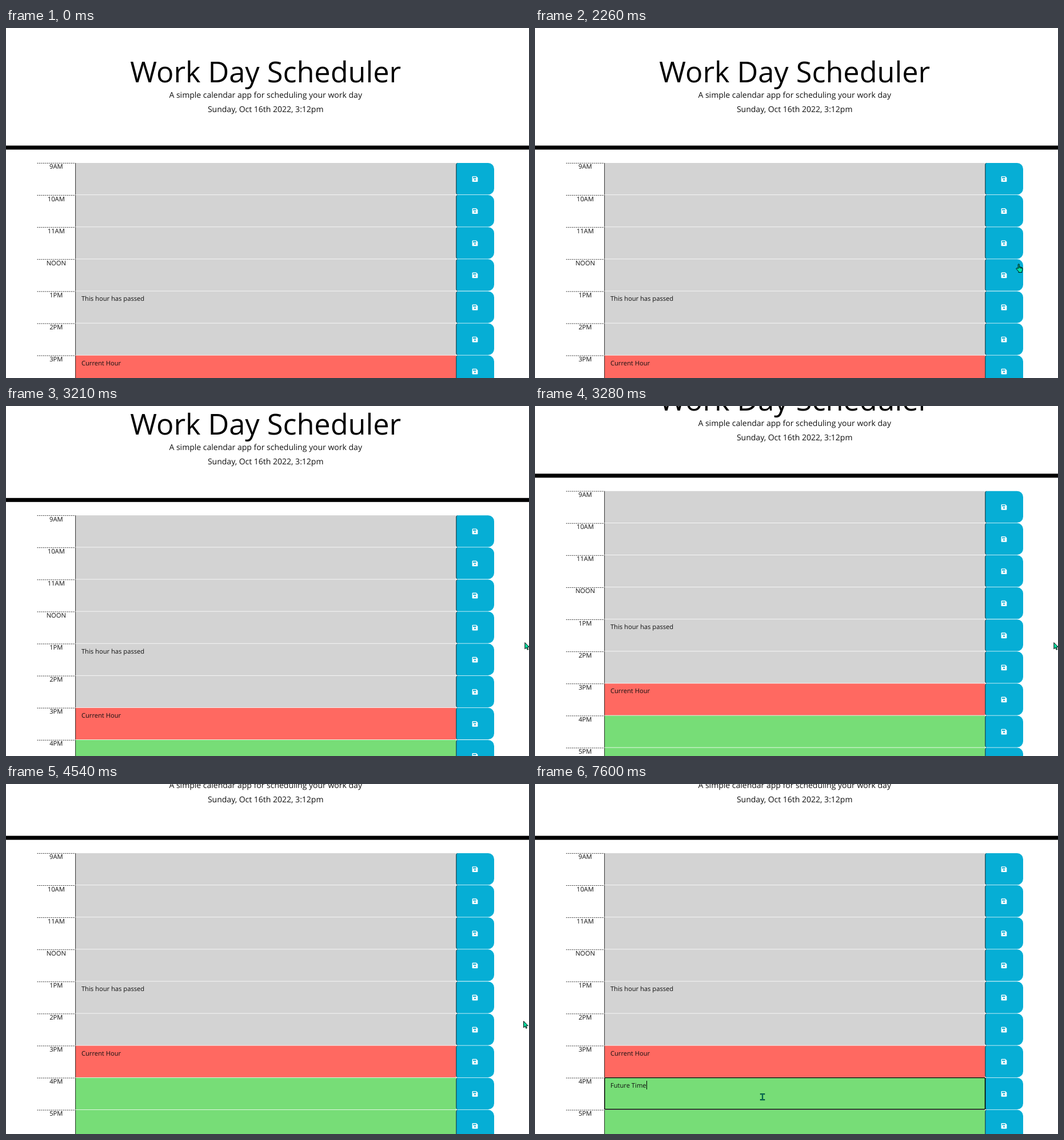
An HTML page that plays this animation: 915 by 612 pixels, repeating every 8 s.

```html
<!DOCTYPE html>
<html lang="en">
<head>
<meta charset="utf-8">
<title>Work Day Scheduler</title>
<style>
  html, body { margin: 0; width: 100%; height: 100%; overflow: hidden; background: #fff; }
  svg { display: block; width: 915px; height: 612px; }
  text { font: 11.2px "Open Sans", sans-serif; fill: #111; white-space: pre; text-rendering: geometricPrecision; }
  .mid { text-anchor: middle; }
  .title { font-size: 50.4px; fill: #000; }
  .lead { font-size: 14px; }
  .dash { stroke: #000; stroke-width: .8; stroke-dasharray: 2.1 1.4; }
  .edge { stroke: #000; stroke-width: .8; fill: none; }
  .skin { fill: #00e3a5; stroke: #000; stroke-width: 1.4; stroke-linejoin: round; }
</style>
</head>
<body>
<svg viewBox="0 0 915 612">
  <defs>
    <path id="save" fill="#fff" fill-rule="evenodd" d="M1 0H7.2L9.8 2.6V8.8Q9.8 9.8 8.8 9.8H1Q0 9.8 0 8.8V1Q0 0 1 0ZM1.4 1.4V3.5H7V1.4ZM3.5 6.3a1.4 1.4 0 1 0 2.8 0a1.4 1.4 0 1 0-2.8 0Z"/>
    <g id="button">
      <path fill="#06aed5" d="M790.4 0H843.5a10.5 10.5 0 0 1 10.5 10.5V44.8a10.5 10.5 0 0 1-10.5 10.5H790.4a2.8 2.8 0 0 1-2.8-2.8V2.8a2.8 2.8 0 0 1 2.8-2.8Z"/>
      <path class="edge" d="M789.4 .4Q787.8 1 787.8 2.8V52.5Q787.8 54.3 789.4 54.9"/>
      <use href="#save" x="815.6" y="23.2"/>
    </g>
  </defs>
  <g id="page">
    <text class="mid title" x="454.2" y="94.8">Work Day Scheduler</text>
    <text class="mid lead" x="454.2" y="122">A simple calendar app for scheduling your work day</text>
    <text class="mid lead" x="454.2" y="147.1">Sunday, Oct 16th 2022, 3:12pm</text>
    <rect y="205.6" width="915" height="7"/>
    <g id="rows"></g>
    <g id="focus">
      <rect x="121.7" y="628.6" width="665.8" height="55.2" rx="1.4" fill="none" stroke="#000" stroke-width="1.4"/>
      <text id="typed" x="131.9" y="645.7"></text>
      <rect id="caret" y="634" width="1" height="15"/>
    </g>
  </g>
  <g id="cursor">
    <path id="arrow" class="skin" transform="scale(.7)" d="M.5 .5V16.5L4.2 13L6.6 18.6L9 17.5L6.6 12H11.6Z"/>
    <path id="hand" class="skin" transform="translate(-5 0) scale(.7)" d="M5.5 12V2Q5.5 .5 7 .5T8.5 2V7.5Q11 6.6 11.5 8.3Q14 7.6 14 9.5Q16.5 9 16.5 11.2V15Q16.5 17 15 18.5V21.5H6.5V19L.9 12.8Q.6 10.2 3 10.5ZM8.5 7.5V11M11.5 8.3V11.5M14 9.5V12"/>
    <g id="beam" fill="none">
      <path stroke="#063b30" stroke-width="2.2" d="M-4.2 -5H4.2M0 -5V5M-4.2 5H4.2"/>
      <path stroke="#00a67c" stroke-width=".8" d="M-3.4 -5H3.4M0 -5V5M-3.4 5H3.4"/>
    </g>
  </g>
  <circle id="press" cx="396.8" cy="549.4" r="10.5" fill="rgb(212,233,34)" fill-opacity=".66"/>
</svg>
<script>
const LOOP = 8000;
const $ = id => document.getElementById(id);
const show = (id, on) => $(id).setAttribute('visibility', on ? 'visible' : 'hidden');

const hours = ['9AM', '10AM', '11AM', 'NOON', '1PM', '2PM', '3PM', '4PM', '5PM'];
const notes = { '1PM': 'This hour has passed', '3PM': 'Current Hour' };
const now = hours.indexOf('3PM');

$('rows').innerHTML = hours.map((hour, i) => {
  const fill = i < now ? '#d3d3d3' : i === now ? '#ff6961' : '#77dd77';
  return `<g transform="translate(0 ${236 + i * 56.1})">
    <path class="dash" d="M54.5 .4H121.5"/>
    <text class="mid" x="87.8" y="10.4">${hour}</text>
    <rect x="121.5" width="666" height="55.3" fill="${fill}"/>
    <path class="edge" d="M121.6 0V55.5"/>
    <text x="131.9" y="17">${notes[hour] || ''}</text>
    <use href="#button"/></g>`;
}).join('');

// Steps done by time t: the first falls on start, the n-th on end.
const steps = (t, start, end, n) => t < start ? 0
  : Math.min(n, 1 + Math.floor((t - start) / (end - start) * (n - 1) + 1e-6));

// a shapes the start, b the slowing down
const ease = (p, a, b) => 1 - (1 - p ** a) ** b;
const curve = (p, from, via, to) => (1 - p) ** 2 * from + 2 * p * (1 - p) * via + p * p * to;

const glides = [
  { start: 520, end: 870, n: 6, a: 1, b: 2, x: [960, 838, 741], y: [700, 530, 414] },
  { start: 2260, end: 2550, n: 5, a: 1, b: 4.5, x: [741, 824, 907.5], y: [414, 411, 413.3] },
  { start: 4540, end: 5140, n: 9, a: 3.6, b: 7, x: [907.5, 470, 397.3], y: [413.3, 620, 549.8] },
  { start: 5530, end: 5600, n: 2, a: 1, b: 1, x: [397.3, 397.6, 398], y: [549.8, 548.5, 547.2] }
];

function drawCursor(t) {
  const g = glides.filter(glide => t >= glide.start).pop();
  let x = 0, y = 0, kind = '';
  if (g) {
    const p = ease(steps(t, g.start, g.end, g.n) / g.n, g.a, g.b);
    x = curve(p, ...g.x);
    y = curve(p, ...g.y);
    kind = x > 854 ? 'arrow' : x > 787 ? 'hand' : 'beam';
  }
  $('cursor').setAttribute('transform', `translate(${x} ${y})`);
  for (const id of ['arrow', 'hand', 'beam']) show(id, id === kind);
  show('press', t >= 5400 && t < 5600);
}

function drawTyping(t) {
  const focused = t >= 5400;
  $('focus').setAttribute('display', focused ? 'inline' : 'none');
  if (!focused) return;
  const count = steps(t, 6410, 7200, 8) + steps(t, 7400, 7600, 3);
  const typed = $('typed');
  typed.textContent = 'Future Time'.slice(0, count);
  $('caret').setAttribute('x', Math.round(131.9 + (count ? typed.getComputedTextLength() : 0)));
  show('caret', t < 5930 || count > 0);
}

function draw(t) {
  const scroll = 115 * ease(steps(t, 3140, 3420, 5) / 5, 2.33, 3.92);
  $('page').setAttribute('transform', `translate(0 ${-scroll})`);
  drawCursor(t);
  drawTyping(t);
}

const start = performance.now();
function tick() {
  draw((performance.now() - start) % LOOP);
  requestAnimationFrame(tick);
}
tick();
</script>
</body>
</html>
```
